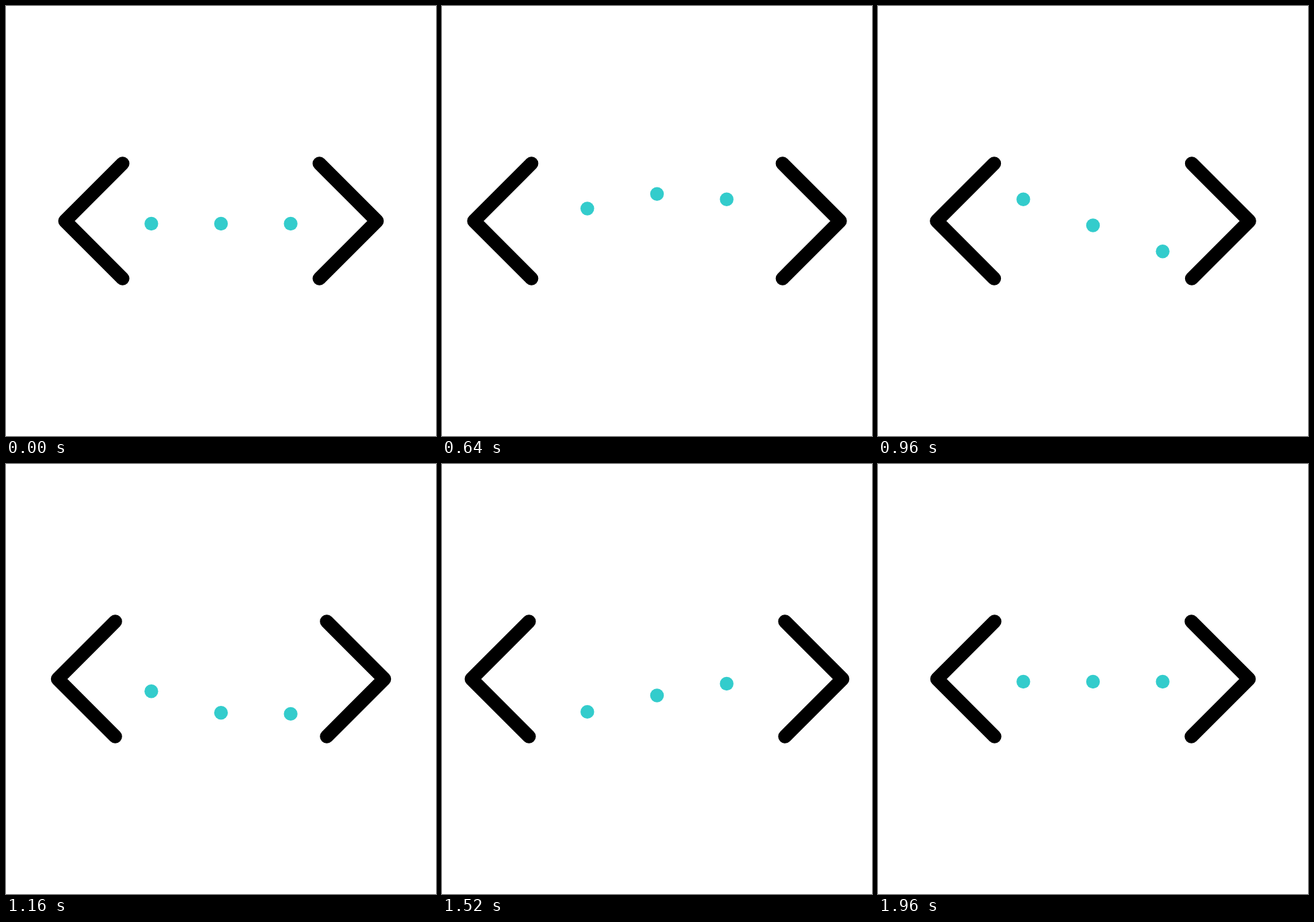
Animation, 640 px wide and 640 px high, one loop 2 s. Source, as an HTML page:

```html
<!DOCTYPE html>
<html lang="en">
<head>
<meta charset="utf-8">
<title>Code brackets loader</title>
<style>
  html, body { margin: 0; height: 100%; overflow: hidden; background: #fff; }
  svg { display: block; width: 100vw; height: 100vh; }
  path { fill: none; stroke: #000; stroke-width: 20.4; stroke-linecap: round; stroke-linejoin: round; }
  circle { fill: #33cccc; }
</style>
</head>
<body>
<svg viewBox="0 0 640 640">
  <path id="left" d="M173.5 234.4L87.9 320L173.5 405.6"/>
  <path id="right" d="M466.5 234.4L552.1 320L466.5 405.6"/>
  <circle cx="216.3" r="10.2"/>
  <circle cx="320" r="10.2"/>
  <circle cx="423.7" r="10.2"/>
</svg>
<script>
const STEP = 40, STEPS = 50, DOT_LAG = 4, DOT_Y = 324;

// Keys: [step, value, ease in, ease out]
const SPREAD = [[1, 0, 0, .67], [13, 44.4, .55, .53], [25, 0, .45, .45], [37, 44.4, .53, .556], [49, 0, .77, 0]];
const BOUNCE = [[1, 0, 0, .6], [13, -45, .38, .43], [27, 50, .43, .43], [41, 0, .555, 0]];

// Cubic Bezier ease with flat ends; a and b are the handle lengths.
function ease(p, a, b) {
  let lo = 0, hi = 1;
  for (let i = 0; i < 30; i++) {
    const s = (lo + hi) / 2, r = 1 - s;
    const x = 3 * a * s * r * r + 3 * (1 - b) * s * s * r + s ** 3;
    if (x < p) lo = s; else hi = s;
  }
  return lo * lo * (3 - 2 * lo);
}

function valueAt(keys, k) {
  if (k <= keys[0][0]) return keys[0][1];
  const i = keys.findIndex(key => key[0] > k);
  if (i < 0) return keys[keys.length - 1][1];
  const [k0, v0, , a] = keys[i - 1], [k1, v1, b] = keys[i];
  return v0 + (v1 - v0) * ease((k - k0) / (k1 - k0), a, b);
}

const left = document.getElementById("left");
const right = document.getElementById("right");
const dots = document.querySelectorAll("circle");
const start = performance.now();

function draw() {
  const time = performance.now() - start;
  const k = Math.floor(time / STEP + .05) % STEPS;
  const shift = valueAt(SPREAD, k);
  left.setAttribute("transform", `translate(${-shift} 0)`);
  right.setAttribute("transform", `translate(${shift} 0)`);
  // The wave runs from right to left.
  dots.forEach((dot, i) => dot.setAttribute("cy", DOT_Y + valueAt(BOUNCE, k - (2 - i) * DOT_LAG)));
  requestAnimationFrame(draw);
}
draw();
</script>
</body>
</html>
```
